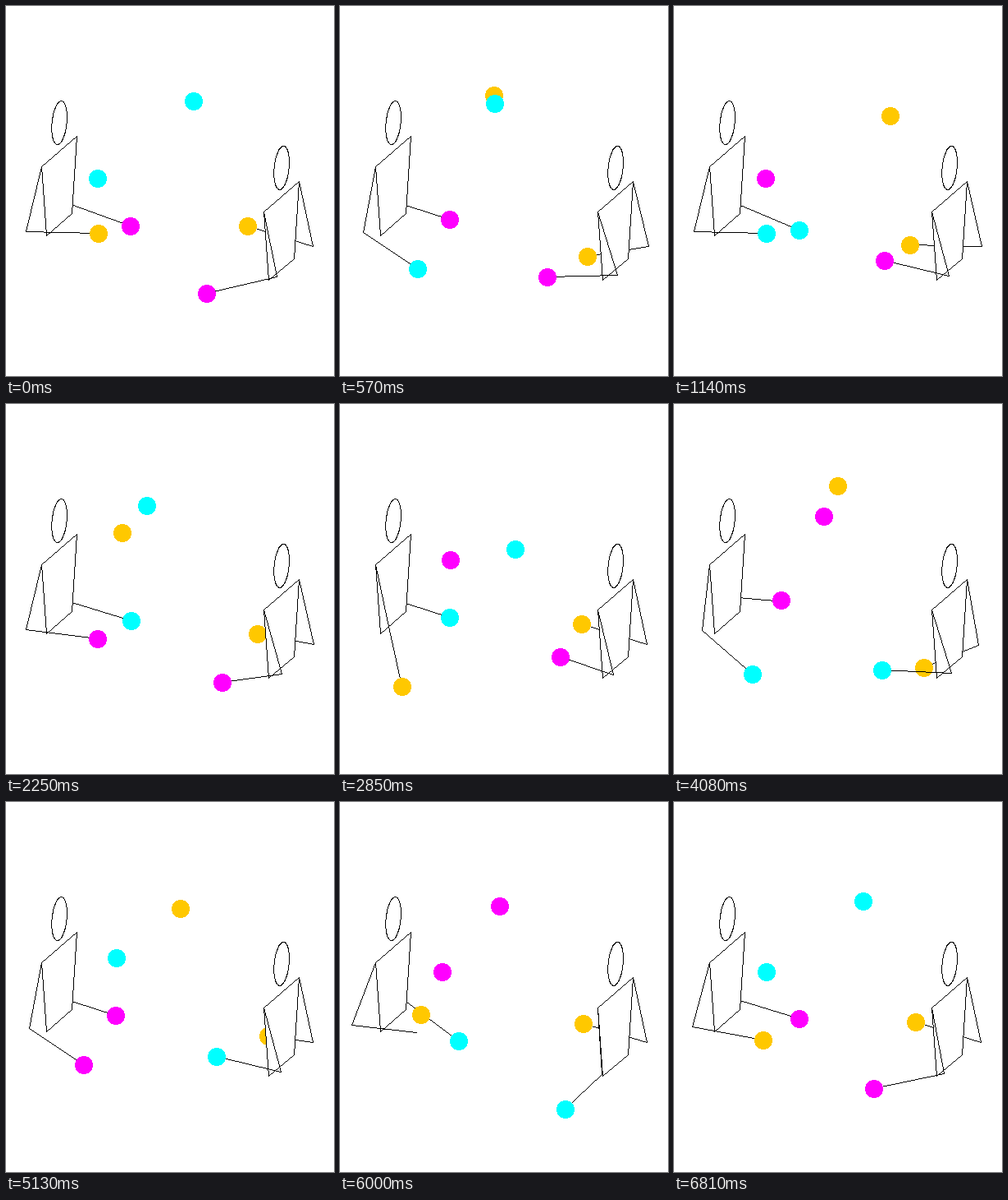
Recreate the animation shown at these times as an HTML page with a canvas. Size 400x450 px, loop 6840 ms.

```html
<!DOCTYPE html>
<html lang="en">
<head>
<meta charset="utf-8">
<title>Two jugglers passing</title>
<style>
html, body { margin: 0; width: 100%; height: 100%; overflow: hidden; background: #fff; }
canvas { display: block; }
</style>
</head>
<body>
<canvas id="stage" width="400" height="450"></canvas>
<script>
const ctx = document.getElementById('stage').getContext('2d');
const STEP = 30, BEAT = 19, CYCLE = 6 * BEAT;
const G = 0.5385;             // gravity, pixels per step squared
const SELF = 33, PASS = 52;   // flight times in steps
const SETTLE = 40, SWING = 29;
const UPPER = 81, FORE = 88;
const CYAN = '#00ffff', PINK = '#ff00ff', GOLD = '#ffc800';

// side: which way the juggler faces; the forearm foreshortens when the hand is
// nearer than reach; give: share of the ball's speed the hand follows at a catch
const rightA = { shoulder: [43, 195], side: 1, release: [112, 276], reach: 109, fold: 0.55, give: 0.55 };
const leftA = { shoulder: [86, 158.4], side: 1, release: [133, 259], reach: 150, fold: 0.55, give: 0.4 };
const rightB = { shoulder: [357, 213.2], side: -1, release: [287, 290], reach: 290, fold: 1.1, give: 0.14, rest: [294, 267] };
const leftB = { shoulder: [314, 250], side: -1, release: [268, 307], reach: 250, fold: 1.1, give: 0.14, rest: [256, 309] };

// Colours are for even and odd cycles
const throws = [
  { beat: 0, from: rightA, to: rightB, time: PASS, catchAt: [318, 277], hues: [GOLD, GOLD] },
  { beat: 1, from: leftA, to: rightA, time: SELF, catchAt: [95, 296], hues: [PINK, PINK] },
  { beat: 2, from: rightA, to: leftA, time: SELF, catchAt: [151, 249], hues: [CYAN, CYAN] },
  { beat: 3, from: leftA, to: leftB, time: PASS, catchAt: [242, 342], hues: [CYAN, PINK] },
  { beat: 4, from: rightA, to: leftA, time: SELF, catchAt: [151, 249], hues: [PINK, PINK] },
  { beat: 5, from: leftA, to: rightA, time: SELF, catchAt: [95, 296], hues: [CYAN, CYAN] },
  { beat: 2, from: rightB, to: rightA, time: PASS, catchAt: [82, 311], hues: [GOLD, GOLD] },
  { beat: 5, from: leftB, to: leftA, time: PASS, catchAt: [159, 244], hues: [PINK, CYAN] }
];

const wrap = n => ((n % CYCLE) + CYCLE) % CYCLE;

// Derive every hand's path from its throws and catches
for (const hand of [rightA, leftA, rightB, leftB]) hand.keys = [];
for (const thr of throws) {
  const { from, to, time, catchAt } = thr, [x, y] = from.release;
  const vx = (catchAt[0] - x) / time;
  const vy = (catchAt[1] - y) / time - G * time / 2;
  thr.start = thr.beat * BEAT;
  thr.vel = [vx, vy];
  const end = thr.start + time;
  from.keys.push({ n: thr.start, p: from.release, v: thr.vel });
  to.keys.push({ n: wrap(end), p: catchAt, v: [vx * to.give, (vy + G * time) * to.give] });
  if (to.rest) to.keys.push({ n: wrap(end + SETTLE), p: to.rest, v: [0, 0] });
  if (from.rest) from.keys.push({ n: wrap(thr.start - SWING), p: from.rest, v: [0, 0] });
}
for (const thr of throws) {
  const end = thr.start + thr.time;
  const waits = throws.filter(o => o.from === thr.to).map(o => wrap(o.beat * BEAT - end));
  thr.life = thr.time + Math.min(...waits);
}
for (const hand of [rightA, leftA, rightB, leftB]) hand.keys.sort((a, b) => a.n - b.n);

function handAt(hand, time) {
  const n = wrap(time), keys = hand.keys, len = keys.length;
  let i = len - 1;
  while (i >= 0 && keys[i].n > n) i--;
  const a = keys[(i + len) % len], b = keys[(i + 1) % len];
  const h = wrap(b.n - a.n), u = wrap(n - a.n) / h, w = 1 - u;
  return [0, 1].map(c => a.p[c] + (b.p[c] - a.p[c]) * u * u * (3 - 2 * u)
    + h * u * w * (a.v[c] * w - b.v[c] * u));
}

function ballAt(thr, u) {
  if (u >= thr.time) return handAt(thr.to, thr.start + u);
  const [x, y] = thr.from.release, [vx, vy] = thr.vel;
  return [x + vx * u, y + vy * u + G * u * u / 2];
}

// Two-bone arm
function elbowOf(hand, [hx, hy]) {
  const [sx, sy] = hand.shoulder, side = hand.side;
  const fore = FORE - hand.fold * Math.max(0, side * (hand.reach - hx));
  const d = Math.hypot(hx - sx, hy - sy), dx = (hx - sx) / d, dy = (hy - sy) / d;
  const along = (d * d + UPPER * UPPER - fore * fore) / (2 * d);
  const out = side * Math.sqrt(Math.max(0, UPPER * UPPER - along * along));
  return [sx + along * dx - out * dy, sy + along * dy + out * dx];
}

// Crisp one-pixel drawing
function dot(x, y) {
  ctx.fillRect(Math.round(x), Math.round(y), 1, 1);
}

function line(...ends) {
  const [x0, y0, x1, y1] = ends.map(Math.round);
  const n = Math.max(Math.abs(x1 - x0), Math.abs(y1 - y0)) || 1;
  ctx.fillStyle = '#000';
  for (let i = 0; i <= n; i++) dot(x0 + (x1 - x0) * i / n, y0 + (y1 - y0) * i / n);
}

function disc([x, y], color) {
  x = Math.round(x);
  y = Math.round(y);
  ctx.fillStyle = color;
  for (let d = -10; d <= 11; d++) {
    const w = Math.round(Math.sqrt(121 - (d - 0.5) ** 2));
    ctx.fillRect(x + 1 - w, y + d, 2 * w, 1);
  }
}

function drawHead(cx, cy) {
  const tilt = 0.1, cos = Math.cos(tilt), sin = Math.sin(tilt);
  ctx.fillStyle = '#000';
  for (let i = 0; i < 240; i++) {
    const a = i * Math.PI / 120, x = 9 * Math.cos(a), y = 26.6 * Math.sin(a);
    dot(cx + x * cos - y * sin, cy + x * sin + y * cos);
  }
}

function drawBody(dx, dy) {
  const pts = [[43, 195], [86, 158.4], [80, 252], [49, 278.6]].map(([x, y]) => [x + dx, y + dy]);
  ctx.fillStyle = '#fff';
  ctx.beginPath();
  pts.forEach(([x, y]) => ctx.lineTo(x + 0.5, y + 0.5));
  ctx.fill();
  pts.forEach((p, i) => line(...p, ...pts[(i + 1) % 4]));
  drawHead(64.6 + dx, 141.6 + dy);
}

function drawArm(hand, n) {
  const tip = handAt(hand, n), elbow = elbowOf(hand, tip);
  line(...hand.shoulder, ...elbow);
  line(...elbow, ...tip);
}

// Balls arriving at the far hand of the right juggler pass behind the body
function drawBalls(n, behind) {
  for (const thr of throws) {
    for (let k = -2; k < 2; k++) {
      const u = n - thr.start - k * CYCLE;
      if (u < 0 || u >= thr.life) continue;
      if ((thr.to === rightB && u > BEAT) === behind) disc(ballAt(thr, u), thr.hues[k & 1]);
    }
  }
}

function draw(n) {
  ctx.fillStyle = '#fff';
  ctx.fillRect(0, 0, 400, 450);
  drawArm(leftA, n);
  drawArm(rightB, n);
  drawBalls(n, true);
  drawBody(0, 0);
  drawBody(271, 54.8);
  drawArm(rightA, n);
  drawArm(leftB, n);
  drawBalls(n, false);
}

const begin = performance.now();
function tick() {
  draw(Math.floor(Math.max(0, performance.now() - begin) / STEP) % (2 * CYCLE));
  requestAnimationFrame(tick);
}
tick();
</script>
</body>
</html>
```
